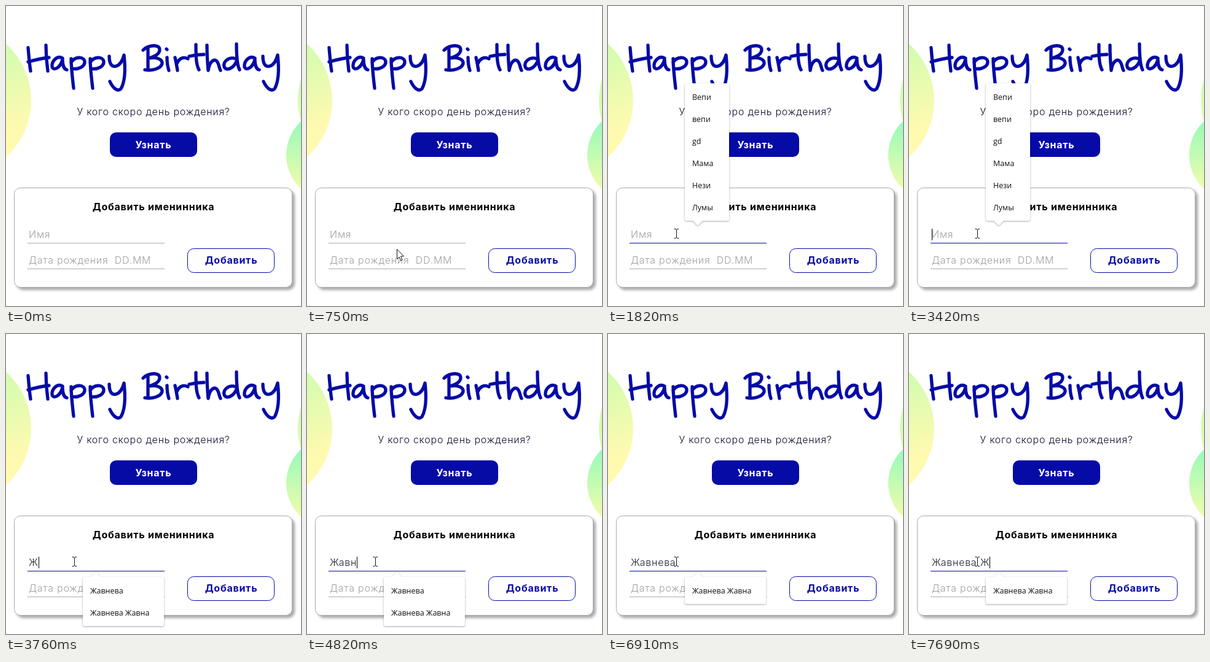
Recreate the animation shown at these times as an HTML page. Size 480 by 489 pixels, loop 8 s.

```html
<!DOCTYPE html>
<html lang="ru">
<meta charset="utf-8">
<title>Happy Birthday</title>
<style>
  html, body { margin: 0; height: 100%; overflow: hidden; background: #fff; }
  svg { display: block; width: 480px; height: 489px; }
  text { font: 300 16px Inter, sans-serif; letter-spacing: .75px; white-space: pre; }
  .mid { text-anchor: middle; }
  .bold { font-weight: 700; }
  .hint { fill: #a0a0a0; }
  .ink { fill: none; stroke: #060ba6; stroke-width: 5.3; stroke-linecap: round; stroke-linejoin: round; }
  .popup { filter: drop-shadow(0 1px 1.5px #0005); }
  .popup text { font: 12.5px "Open Sans", "Noto Sans", sans-serif; letter-spacing: 0; fill: #111; }
</style>
<svg viewBox="0 0 480 489">
  <defs>
    <linearGradient id="lime" x1=".3" y1="0" x2=".7" y2="1">
      <stop offset=".1" stop-color="#c0fdaf"/><stop offset=".8" stop-color="#fffab0"/>
    </linearGradient>
    <linearGradient id="mint" x2="0" y2="1">
      <stop offset=".1" stop-color="#93fabb"/><stop offset=".9" stop-color="#f4fcaa"/>
    </linearGradient>
    <path id="a" d="M92 85C83 80 74 90 75 99C77 106 88 102 92 87C92 95 94 103 99 104"/>
    <path id="p" d="M106 86C106 100 108 117 110 134M106 92C112 82 126 82 128 90C129 99 117 104 108 102"/>
    <path id="y" d="M168 82C168 94 172 100 179 98C186 96 190 88 192 80C194 98 195 121 187 135C181 141 173 132 169 123"/>
  </defs>

  <circle cx="-83" cy="154" r="124" fill="url(#lime)"/>
  <circle cx="599" cy="154" r="124" fill="url(#lime)"/>
  <circle cx="531" cy="243" r="75" fill="url(#mint)"/>

  <g class="ink" role="img" aria-label="Happy Birthday">
    <path d="M36 68C37 80 38 94 40 106M36 91C47 88 58 85 70 84M65 64C65 78 66 92 68 106"/>
    <use href="#a"/><use href="#p"/><use href="#p" x="31"/><use href="#y"/>
    <path d="M231 69C231 82 231 95 231 104M223 72C232 63 250 62 250 71C250 79 240 83 233 85C246 83 255 87 254 94C252 102 238 106 226 104"/>
    <path d="M262 84C262 92 263 99 265 105M261 70l1 1M275 84C277 92 278 99 279 105M278 94C281 86 288 82 296 86"/>
    <path d="M309 63C309 80 309 95 314 104M298 82C306 80 314 79 322 79"/>
    <path d="M327 64C327 80 328 94 329 105C331 92 337 86 342 89C347 93 346 100 349 105"/>
    <path d="M374 86C362 82 353 91 355 99C358 107 371 102 376 88M375 62C375 78 376 96 380 104"/>
    <use href="#a" x="313"/><use href="#y" x="250"/>
  </g>

  <text class="mid" x="240" y="178" fill="#111133">У кого скоро день рождения?</text>
  <rect x="169" y="206" width="142" height="40" rx="10" fill="#060ba6"/>
  <text class="mid bold" x="240" y="232" fill="#fff">Узнать</text>

  <rect x="13.5" y="296.5" width="452" height="162" rx="10" fill="#fff" stroke="#aaa"
        style="filter:drop-shadow(4px 4px 2px #0005)"/>
  <text class="mid bold" x="240" y="333">Добавить именинника</text>
  <path id="line" d="M35 386.5H258"/>
  <path d="M35 428.5H258" stroke="#aaa"/>
  <text id="name" x="37" y="378"></text>
  <text class="hint" x="37" y="420">Дата рождения  DD.MM</text>
  <rect x="295.5" y="395.5" width="141" height="39" rx="10" fill="#fff" stroke="#060ba6"/>
  <text class="mid bold" x="366.5" y="420" fill="#060ba6">Добавить</text>
  <rect id="caret" y="363" width="1" height="19"/>

  <g id="history" class="popup"></g>
  <g id="matches" class="popup"></g>
  <g id="match" class="popup"></g>

  <circle id="click" cx="110" cy="370" r="12" fill="#ffff80" style="mix-blend-mode:multiply"/>
  <path id="beam" d="M-3.5-7.5H-1L.5-6.5L2-7.5H4M.5-6.5V6.5M-3.5 7.5H-1L.5 6.5L2 7.5H4" fill="none" stroke="#111"/>
  <path id="arrow" d="M.5.5V16.5L4 13L6.5 19L9 18L6.5 12H11.5Z" fill="#fff" stroke="#111"/>
</svg>
<script>
const $ = id => document.getElementById(id);
const show = (id, on) => $(id).style.display = on ? '' : 'none';
const LOOP = 8000, FOCUS = 1280;
const FULL = 'Жавнева Жавна';
const keys = [3760, 4290, 4490, 4820, 5110, 5420, 5760, 6360, 7690];
const caretOff = [[1820, 2350], [2880, 3420], [6280, 6360], [6910, 7420]];

function fillPopup(id, y, w, h, arrow, rows) {
  $(id).innerHTML =
    `<rect x="125" y="${y}" width="${w}" height="${h}" rx="3" fill="#fff"/>` +
    `<path d="${arrow}" fill="#fff"/>` +
    rows.map((s, i) => `<text x="137" y="${y + 27 + 36 * i}">${s}</text>`).join('');
}
const up = 'M137 397L146 388L155 397Z';
fillPopup('history', 126, 72, 224, 'M137 349L146 358L155 349Z', ['Вепи', 'вепи', 'gd', 'Мама', 'Нези', 'Лумы']);
fillPopup('matches', 396, 132, 80, up, [FULL.split(' ')[0], FULL]);
fillPopup('match', 396, 132, 44, up, [FULL]);

function pointerAt(t) {
  if (t >= 1160) return [111, 371];
  if (t >= 1090) return [115, 376];
  const step = Math.min(8, Math.floor((t - 420) / 65)) / 8;
  const p = step * (2 - step);
  return [303 - 183 * p, 480 - 98 * p];
}

function draw(t) {
  const count = keys.filter(k => t >= k).length;
  const focused = t >= FOCUS;
  const name = $('name');
  name.textContent = count ? FULL.slice(0, count) : 'Имя';
  name.setAttribute('fill', count ? '#222233' : '#a0a0a0');
  $('line').setAttribute('stroke', focused ? '#060ba6' : '#aaa');

  $('caret').setAttribute('x', count ? Math.round(37 + name.getComputedTextLength()) : 37);
  show('caret', focused && !caretOff.some(([a, b]) => t >= a && t < b));

  show('history', t >= 1420 && !count);
  show('matches', count > 0 && count < 8);
  show('match', count >= 8);

  const [x, y] = pointerAt(t);
  const overInput = x > 35 && x < 258 && (y > 360 && y < 387 || y > 403 && y < 429);
  const place = `translate(${Math.round(x)} ${Math.round(y)})`;
  $('beam').setAttribute('transform', place);
  $('arrow').setAttribute('transform', place);
  show('beam', t >= 420 && overInput);
  show('arrow', t >= 420 && !overInput);
  show('click', t >= 1220 && t < 1420);
  $('click').setAttribute('opacity', t < 1350 ? 1 : .5);
}

const start = performance.now();
(function tick() {
  draw((performance.now() - start) % LOOP);
  requestAnimationFrame(tick);
})();
</script>
</html>
```
